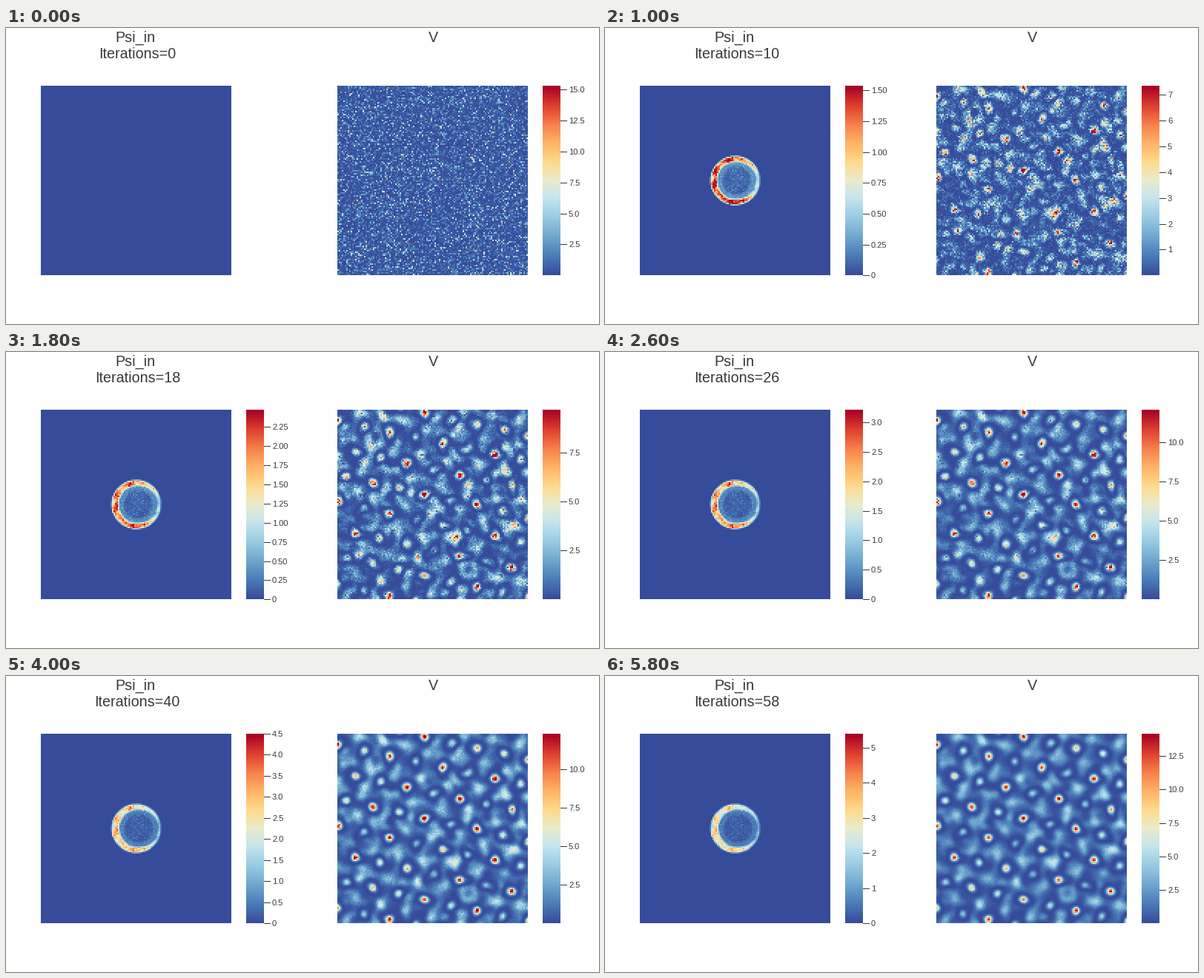
Recreate the animation shown at these times as a matplotlib script. Size 800 px wide and 400 px high, loop 6000 ms.

```python
import numpy as np
import matplotlib.pyplot as plt
from matplotlib.animation import FuncAnimation
from matplotlib.colors import LinearSegmentedColormap

plt.rcParams["font.family"] = "Liberation Sans"
INK = "#3a3a3a"
PX = 0.72  # points per pixel at 100 dpi
N = 128
TOP, BOTTOM, SIDE = 78, 334, 257
CMAP = LinearSegmentedColormap.from_list("sunset", [
    "#364B9A", "#4A7BB7", "#6EA6CD", "#98CAE1", "#C2E4EF", "#EAECCC",
    "#FEDA8B", "#FDB366", "#F67E4B", "#DD3D2D", "#A50026"], N=512)

rng = np.random.default_rng(7)
n1, n2, n3 = rng.standard_normal((3, N, N))
gx, gy = np.meshgrid(np.arange(N) + 0.5, np.arange(N) + 0.5)


def band_noise(radius):
    k = np.fft.fftfreq(N) * N
    mask = np.hypot(k[:, None], k[None, :]) < radius
    out = np.fft.ifft2(np.fft.fft2(rng.standard_normal((N, N))) * mask).real
    return out / out.std()


def lattice_field():
    """Bright sites on lattice points, weaker ones at cell centres,
    pale negative patches on the cell edges."""
    a, b = np.array([23.5, 41.7]), np.array([47, -26.5])
    x, y = 447 + gx * SIDE / N - 565, TOP + gy * 256 / N - 192
    u, v = np.tensordot(np.linalg.inv(np.column_stack([a, b])), [x, y], 1)

    def sites(offset):
        du, dv = [c - offset - np.round(c - offset) for c in (u, v)]
        dx, dy = a[0] * du + b[0] * dv, a[1] * du + b[1] * dv
        return np.exp(-(dx ** 2 + dy ** 2) / (2 * 4.3 ** 2))

    waves = np.cos(2 * np.pi * u) * np.cos(2 * np.pi * v)
    return 3.2 * sites(0) + 1.75 * sites(0.5) - 1.9 * (0.4 - 0.6 * waves)


speckle = band_noise(16.5)
soft = band_noise(24)
lattice = lattice_field()


def v_scale(it):
    return np.interp(it, [0, 2, 10, 26, 40, 58], [15.34, 9, 7.35, 12.06, 12.33, 14.17])


def psi_scale(it):
    return np.interp(it, [2, 10, 18, 40, 48, 58], [0.75, 1.54, 2.476, 4.5, 5.22, 5.4])


def potential(it):
    grain = np.exp(-it / 8)
    f = (1 - np.exp(-it / 10)) * lattice
    f += (1 - grain) * (0.25 + 0.7 * np.exp(-it / 16)) * speckle
    f = f * (1 + 0.25 * np.exp(-it / 25) * n1) + (0.04 + 0.96 * grain) * n2
    f *= 1 - 0.8 * np.exp(-((it - 20) / 9) ** 2) * (abs(n3) > 2.4)
    return f ** 2 / v_scale(it)


def psi(it):
    if it == 0:
        return np.zeros((N, N))
    fade = 0.55 + 0.6 * np.exp(-it / 26)
    x, y = gx - 64.2, gy - 64
    r, th = np.hypot(x, y), np.arctan2(y, x)
    r_in = np.hypot(x - 1.7 * (1 - np.exp(-it / 20)), y)
    ring = 1 - 0.62 * np.exp(-th ** 2)
    ring -= 0.25 * np.exp(-((abs(th) - 2.35) / 0.2) ** 2)
    ring *= fade * (1 + 0.12 * soft + 0.1 * n1)
    ring *= np.clip((17 - r) / 1.5, 0, 1) * np.clip((r_in - 11.8) / 2, 0, 1)
    core = 0.03 + 0.05 * abs(n2) + 0.1 * np.clip(r_in - 9, 0, 1)
    return np.where(r < 17, np.maximum(ring, np.where(r_in < 13.4, core * fade, 0)), 0)


fig = plt.figure(figsize=(8, 4), dpi=100, facecolor="white")
ax = fig.add_axes([0, 0, 1, 1])


def image(data, x0, x1):
    ax.imshow(data, cmap=CMAP, vmin=0, vmax=1, interpolation="nearest",
              aspect="auto", extent=(x0, x1, BOTTOM, TOP))


def text(x, y, s, size, ha="center"):
    ax.text(x, y, s, fontsize=size, ha=ha, va="baseline", color=INK)


def colorbar(x, top, step, decimals, zero):
    image(np.linspace(1, 0, 256)[:, None], x, x + 24)
    for k in range(0 if zero else 1, int(top / step + 0.01) + 1):
        y = BOTTOM + 0.3 - 256.5 * k * step / top
        ax.plot([x + 24, x + 32], [y, y], color=INK, lw=PX)
        text(x + 35, y + 4, f"{k * step:.{decimals}f}" if k else "0", 8, "left")


def draw(i):
    it = 2 * i
    ax.cla()
    ax.axis("off")

    text(174.4, 19, "Psi_in", 14.2)
    text(177.3, 41, f"Iterations={it}", 14.2)
    text(576, 19, "V", 14.2)

    image(psi(it), 47, 47 + SIDE)
    image(potential(it), 447, 447 + SIDE)

    if it:
        top = psi_scale(it)
        step, dec = (0.25, 2) if top < 2.6 else (0.5, 1) if top < 4.75 else (1, 0)
        colorbar(324, top, step, dec, True)
    top = v_scale(it)
    step, dec = (1, 0) if top < 8.6 else (2.5, 1)
    colorbar(724, top, step, dec, False)

    ax.set_xlim(0, 800)
    ax.set_ylim(400, 0)
    return []


anim = FuncAnimation(fig, draw, frames=30, interval=200, repeat=True,
                     init_func=lambda: [])
plt.show()
```
